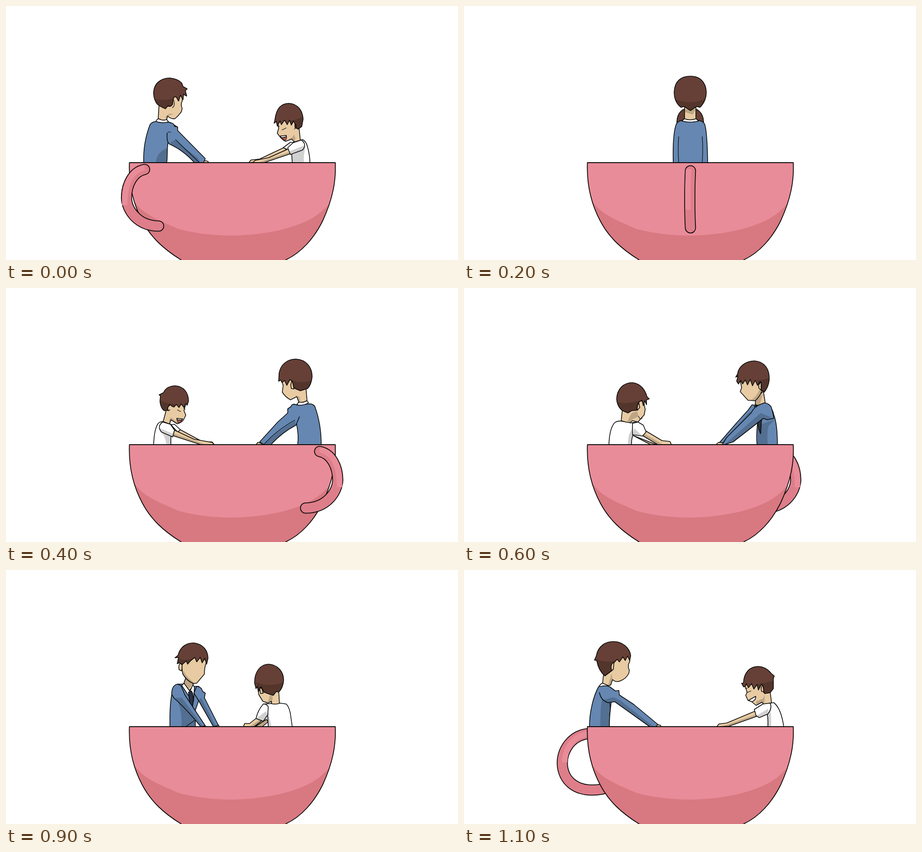
Write an HTML page that moves like this. It is 998x561 px and loops after 1200 ms.

```html
<!DOCTYPE html>
<html lang="en">
<head>
<meta charset="utf-8">
<title>Teacup ride</title>
<style>
  html, body { margin: 0; height: 100%; overflow: hidden; background: #fff; }
  svg { display: block; width: 998px; height: 561px; }
  path { stroke: #080808; stroke-width: 1.6; stroke-linejoin: round; }
  .h { fill: #664036; }
  .k { fill: #e8cba3; }
  .b { fill: #6587b1; }
  .w { fill: #fff; }
  .n { fill: #2b3447; }
  .m { fill: #b4574c; stroke-width: 1; }
  .s { fill: #000; fill-opacity: .18; stroke: none; }
  .l { fill: none; stroke-width: 1.2; }
  .tube path { fill: none; stroke-linecap: round; }
</style>
</head>
<body>
<svg viewBox="0 0 998 561">
  <clipPath id="bowl"><path d="M272.5 346H727C729 385 722 425 699 475C680 513 652 545 617 561H387C348 537 320 511 301 475C277 430 271 385 272.5 346Z"/></clipPath>
  <g id="back"></g>
  <g id="cup">
    <rect x="260" y="346" width="480" height="215" fill="#e98c99" clip-path="url(#bowl)"/>
    <path clip-path="url(#bowl)" style="fill:#d87880;stroke:none" d="M270 405L283 430C300 460 340 474 380 492C450 512 545 512 620 491C665 478 695 462 717 432L740 400V561H270Z"/>
    <path style="fill:none;stroke-width:1.8" d="M387 561C348 537 320 511 301 475C277 430 271 385 272.5 346H727C729 385 722 425 699 475C680 513 652 545 617 561"/>
  </g>
  <g id="front"></g>
</svg>
<script>
// Each pose is a stack of "class path" lines, keyed by its step of the turn.
const man = {
  0: `k M338 216L336 249Q345 254 354 253L357 243Q364 250 373 249Q380 243 387 234L389 226Q385 218 389 210L391 196L366 193Z
s M354 253L357 243L371 238L360 238L352 244Z
h M326 195C325 170 343 159 362 159Q380 161 388 170L391 178L400 183L396 187L399 199L392 195L391 207L385 197L381 210L376 201L371 201L369 207L368 217Q362 225 358 220L352 227Q340 222 334 217Q327 208 326 195Z
s M328 205Q350 211 370 203L368 217Q362 225 358 220L352 227Q340 222 334 217Z
l M369 206Q373 212 371 221L367 225
b M304 346C303 315 309 285 318 262Q322 256 331 255L362 257L378 267L358 300C355 315 357 330 355 346Z
s M331 346C333 325 345 318 356 314L355 346Z
w M331 255Q333 250 337 249Q345 254 355 251L359 256Q345 260 331 255Z
k M436 341L446 343L447 346H433Z
b M362 258Q371 258 372 266L379 267V275L440 337L436 346H416Q392 319 361 305Q354 300 356 280
s M363 301L372 296L424 336L430 346H416Q392 319 363 305Z
l M357 278L364 279M374 295L426 345`,
  1: `k M394 224L393 248Q402 254 411 252L414 244Q420 250 428 248Q437 238 440 226V203L420 200Z
s M411 252L414 244L428 245L414 238Z
h M376 190C378 168 393 157 412 157Q430 158 437 170Q443 178 444 186L448 191L444 196V209L440 201L438 210L433 204L429 213L426 227Q420 231 414 231L396 226Q381 216 377 203Z
s M378 206Q402 218 434 206L429 213L426 227Q420 231 414 231L396 226Q381 216 378 206Z
k M433 205Q428 212 428 222L433 219Z
b M420 311L441 346H418Z
s M420 311L441 346H418Z
b M362 346C361 310 364 275 371 258Q374 252 381 252L427 257L428 295L421 300Q421 325 420 346Z
w M387 253L392 248Q401 254 410 250L413 257Q398 258 387 253Z
b M425 257Q434 259 435 268L441 268V284Q455 318 475 345H461Q445 320 430 296L422 294L424 280
s M422 294L432 289Q453 325 465 345H461Q445 320 430 296Z`,
  2: `k M487 220V252H512V220Z
s M487 228H512L505 240L487 234Z
h M464 190C465 165 480 155 500 155S534 167 535 190Q535 210 521 224L514 222L500 231L486 222L479 224Q464 212 464 190Z
s M466 205Q499 220 533 205Q530 216 521 224L514 222L500 231L486 222L479 224Q469 216 466 205Z
b M462 346C461 310 463 275 469 260Q474 253 485 252H514Q526 253 531 260Q537 275 538 346Z
w M481 254L487 249Q499 254 512 249L518 254Q499 259 481 254Z
l M474 346Q472 315 474 288M526 346Q528 315 526 288`,
  4: `k M606 200L612 215L610 230Q616 240 628 247L642 240L646 251L645 257L665 252L662 218L630 198Z
s M642 240L646 253L650 250L648 240L638 237Z
h M602 206L603 188C606 170 620 157 640 157C663 158 676 175 676 196Q674 214 666 222L650 227L640 223Q632 218 631 206L627 202L620 215L615 204L610 209L606 203Z
s M632 205Q655 212 675 203Q672 216 666 222L650 227L640 223Q633 216 632 205Z
k M632 205Q627 212 630 222L636 223Z
b M644 346Q647 325 641 298L638 262Q640 257 648 258L668 256Q678 255 682 262Q696 300 696 346Z
w M642 257L647 252Q656 254 664 249L668 253Q662 259 646 259Z
k M552 346L556 341L564 343V346Z
b M641 258Q632 254 629 262L622 267V276L600 296L560 340L570 346H585Q608 320 640 303L648 284
s M638 294L640 303Q608 320 585 346H570Q600 315 638 294Z
l M570 345Q600 312 638 292`,
  11: `k M309 222L306 250L318 256L324 254L328 242Q335 249 345 245Q358 240 364 228L365 221Q360 212 366 202L364 186L330 193Z
s M326 228L328 242L324 254L318 256Z
h M292 190C296 168 312 158 330 158C350 158 366 172 368 189L366 200L361 190L356 200L351 192L343 203L338 197L331 205Q324 215 327 222L311 234Q297 222 293 200L288 199Z
s M293 197Q312 206 340 199L331 205Q324 215 327 222L311 234Q297 222 293 200Z
k M331 204Q322 208 326 222L330 219Z
b M277 346C277 315 285 280 297 258L303 252L322 259L325 293Q321 320 321 346Z
s M301 346Q301 300 305 285L325 293Q321 320 321 346Z
w M299 257Q301 251 306 250L318 255L315 258Z
k M426 341L434 343L435 346H420Z
b M303 257Q313 254 322 258L334 267L342 266L343 276L375 297L428 341L424 346H410L333 291L318 293Q302 288 299 270
s M306 287L330 281L345 288L419 346H410L333 291L318 293Z
l M321 292Q325 305 321 322`,
  6: `b M627 270L636 258L645 259L640 277L572 346H560L600 300Z
s M640 272L630 274L566 346H572Z
k M644 244L643 257L655 263L665 253L661 228Z
s M644 249L643 257L652 261L661 232Z
k M609 200L613 220L610 229L627 248L643 249Q655 238 658 226L655 200Z
s M643 249Q655 238 658 226L652 225Q648 238 632 249Z
h M602 206L605 194L600 197L604 190C606 173 622 161 642 161C665 163 675 180 674 203Q672 220 663 230L656 225Q658 213 654 207L648 215L643 204L637 216L632 202L626 214L621 203L615 212L611 204L606 212Z
s M648 203Q662 204 673 198Q674 218 663 230L656 225Q658 213 654 207L648 215Z
k M656 208Q649 212 651 221L656 226Z
b M663 254Q680 260 684 280Q692 300 692 346H647Q645 325 648 300L642 262Z
s M648 346V304L686 290L672 305Q668 330 671 346Z
w M641 261L648 262L644 272Z
n M648 293L657 289L655 322Q649 310 648 293Z
k M556 346L562 341L573 342L575 346Z
b M657 256Q668 250 678 262Q683 277 684 288L670 291L661 288L594 340L575 346H570L580 330L634 276Q640 262 657 256Z
s M684 288L670 291L661 288L594 340L575 346L655 276Z`,
  9: `k M397 238L392 252L403 268L413 262V250Z
s M397 238L392 252L403 264L413 251Z
k M387 203L390 229Q398 244 414 251L421 250L438 230Q438 215 442 205L439 190H400Z
s M390 229Q398 244 414 251L418 250Q400 240 392 222Z
h M380 188C385 168 400 161 414 161C435 163 446 178 446 195L443 208L439 195L433 205L429 193L421 203L417 193L408 200L401 208L398 201L389 209L383 205L378 207L381 193L373 194Z
s M380 196Q400 202 417 193L408 200L401 208L398 201L389 209L383 205L378 207Z
k M385 206Q380 210 382 220L388 223L389 210Z
b M362 346Q361 300 366 275Q368 255 380 252L393 252L403 268L413 257L426 257L430 275L418 310V346Z
s M387 346Q390 320 381 294L405 310L417 332V346Z
w M388 255L393 250L406 268L413 253L416 260L414 290L408 285Z
n M403 270L409 267L412 272L414 285L411 310L407 300L404 280Z
k M428 346L433 342L441 345ZM458 346L462 341L470 343V346Z
b M421 257Q432 258 434 268L440 272L438 282L469 343L458 346L425 288L415 272Z
s M425 288L431 282L463 345H458Z
b M366 275Q365 256 378 252L386 255L390 264L395 276L440 344L430 346Q405 315 380 291L371 283Z
s M371 283L388 282L434 344L430 346Q405 315 380 291Z
l M398 345L417 332`,
  8: `k M487 238V262H512V238Z
k M466 200Q466 225 476 236L494 251H505L523 236Q533 225 533 200Z
h M464 196C464 172 480 161 500 161S535 172 535 196L532 210L526 196L520 206L514 195L508 205L501 195L494 205L488 195L481 206L475 196L468 210Z
b M465 346Q462 300 465 275Q468 255 480 253H519Q531 255 534 275Q537 300 534 346Z
w M486 254H513L500 290Z
n M496 264H503L506 300L500 310L494 300Z`
};

const boy = {
  0: `k M613 313L620 317L562 344L536 346L541 340L560 338Z
w M612 313L628 301L636 302L622 317Z
k M600 258L602 270L599 281L605 289Q611 296 617 299L631 294L637 301L650 297L647 269L640 253H605Z
s M617 299L632 290L636 284L639 292L637 300L631 294Z
m M606 287L619 286Q621 293 617 297Q610 295 606 287Z
w M606 287L619 286V289L608 291Z
l M609 274L619 269M600 267L604 265
h M594 250C597 225 608 215 625 215C645 216 655 232 656 250L653 266L645 272L638 268V260L635 254L630 263L626 252L621 262L615 252L608 262L605 254L599 265L597 255L592 259Z
s M625 253Q640 252 655 245L653 266L645 272L638 268V260L635 254L630 263Z
l M637 260Q643 262 640 270L636 272
w M632 346L630 312L634 301L655 295Q663 299 666 312Q671 330 671 346Z
s M632 346V328L655 318L662 308Q656 330 658 346Z
k M625 315L629 326L570 346H545L550 341L580 335Z
s M628 322L629 326L570 346H556Z
w M634 302L652 296Q665 305 655 318L628 328L622 313Z
s M628 328L626 321L658 308L655 318Z`,
  1: `k M547 318L555 326L522 346H505L507 342L518 340Z
k M549 260L552 283L560 293Q567 298 576 296L575 305L583 312L593 303L589 272L584 256H552Z
s M567 297L584 286L588 287L576 301V296Z
m M554 288L571 288Q570 297 562 296Z
w M554 288L571 288L568 291H557Z
l M551 275L558 276M564 274L574 271M558 279L556 283
h M545 255C547 232 558 222 573 222C590 223 600 238 600 254Q598 270 591 276L587 271L585 260L580 268L577 258L572 266L568 257L561 265L557 258L551 266L548 259L543 265Z
s M568 257Q585 260 599 250Q598 270 591 276L587 271L585 260L580 268L577 258L572 266Z
l M586 263Q590 268 587 275
w M556 312L562 303L575 304Q583 315 592 302L608 299Q617 306 619 325L620 346H567L566 328Z
s M568 346L567 336L592 334L612 320Q596 334 600 346Z
w M549 318L562 302L571 306L565 329L556 326Z
s M556 326L568 312L565 329Z
k M586 321L592 332L560 346H530L540 338Z
w M592 302L607 298Q616 306 614 316L592 335L584 322Z
s M592 335L588 328L611 306L614 316Z`,
  2: `h M470 255C471 235 483 225 499 225S528 235 529 255V285H470Z`,
  3: `k M451 318L446 326L474 345L490 346L492 342L483 341Z
k M412 260L405 275V304Q412 313 421 307L422 293Q431 299 438 295L444 285L441 277L448 268V256L420 253Z
s M422 293Q427 298 433 298L418 290L415 284L414 291L421 300Z
m M426 288L440 289Q438 297 433 296Z
w M426 288L440 289L437 292L429 291Z
l M423 273L431 276M438 275L446 272
h M397 255L398 240L396 238L404 231C410 224 418 222 426 222C443 223 453 237 453 254L450 262L446 257L442 264L437 257L432 265L428 258L423 265L417 262L413 262L409 276L404 274Q397 266 397 255Z
s M398 252Q412 261 428 258L423 265L417 262L413 262L409 276L404 274Q398 266 398 252Z
k M413 262Q406 264 410 275L413 272
w M376 346Q378 312 387 300L405 304Q413 314 421 306L430 302V346Z
s M390 346Q395 336 407 333L430 336V346Z
w M430 302L436 301L451 317L446 327L434 328L428 312Z
s M434 328L432 314L446 327Z
k M412 320L406 331L437 346H470L460 341L446 339Z
w M388 300Q380 305 386 318L406 334L412 321L405 304Z
s M386 312L406 327L412 321L406 334L386 318Z`,
  4: `k M385 313L379 318L430 341L445 345L460 346L455 340L433 339Z
w M364 302L372 301L385 313L379 318Z
k M357 258L347 295L361 301L364 291L378 300Q387 298 392 291L397 281L393 271L397 255L370 250Z
s M364 291L378 300L382 299L364 286L361 290L360 300Z
m M377 288L390 289Q386 298 380 298Q377 294 377 288Z
w M377 288L390 289L387 292L378 291Z
l M378 269L386 273M392 266L396 268
h M340 250L341 238L338 236L348 231C352 221 362 216 374 216C393 217 403 232 403 250L400 259L397 255L393 264L387 256L382 264L376 257L371 263L366 261L362 257Q357 261 358 270L349 271Q341 264 340 250Z
s M341 248Q356 256 376 257L371 263L366 261L362 257Q357 261 358 270L349 271Q342 264 341 248Z
k M362 259Q355 262 358 271L362 269
w M326 346Q327 312 336 299Q340 295 346 295L364 301L372 313L364 330V346Z
s M354 346Q352 328 343 319L364 327V346Z
k M372 314L368 326L430 346H460L455 341L415 334Z
s M369 321L368 326L430 346H442Z
w M346 296Q333 305 343 318L368 329L372 314L363 301Z
s M340 310L369 322L368 329L343 318Z`,
  11: `k M620 254L625 270L622 277L627 288L634 290L645 299L658 292L664 300L679 293L676 269L655 251Z
s M645 299V290L660 284L664 276L663 299L658 292Z
w M628 288L644 279Q646 286 636 291Z
l M624 271L634 267M621 262L626 261
h M617 250C618 225 632 213 650 213Q667 214 678 228L685 234L683 240V262L676 271L664 273L660 268L661 258L657 252L650 265L647 253L640 263L635 251L628 260L624 251L620 258L617 258L613 250Z
s M648 252Q665 249 684 245L683 262L676 271L664 273L660 268L661 258L657 252L650 265Z
k M660 255Q654 258 657 268L662 269Z
w M662 296L684 293Q700 305 706 346H671Q672 325 668 312Z
s M671 346Q672 325 668 318L676 304Q679 325 678 346Z
k M642 312L647 323L585 345L558 346L563 340L580 338Z
s M645 319L647 323L585 345H572Z
w M641 308L660 296L676 294Q681 305 671 318L652 326L645 322Z
s M652 326L645 322L672 306L671 318Z`,
  6: `k M374 326L425 346H412Z
s M374 326L425 346H412Z
k M350 266L347 293L365 299L372 293L384 296L398 280L400 268L397 252L385 246Z
s M361 294L370 276L382 272L386 284L372 290L366 298Z
l M385 283L389 290L394 287
h M337 245C338 222 353 209 372 209C390 211 400 225 404 240L409 245L403 247V258L399 249L396 260L393 248L386 252Q381 262 382 270L370 271L362 276L350 271Q338 262 337 245Z
s M338 252Q360 257 389 249L386 252Q381 262 382 270L370 271L362 276L350 271Q340 264 338 252Z
k M386 253Q381 262 383 270L388 264Z
w M320 346Q321 312 332 298Q338 293 347 294L368 298L380 296L374 322Q369 335 370 346Z
s M361 346L364 325L374 304L380 324L374 324Q369 335 370 346Z
k M402 316L437 337L455 339L458 346H428L394 326Z
s M398 322L440 346H428L394 326Z
w M372 299L384 296L396 303L402 318L394 327L372 324Z
s M372 324L376 310L394 327Z`,
  9: `k M575 330L579 335L566 346H550Z
s M575 330L579 335L566 346H550Z
k M555 256L558 275L567 290L578 294L586 290V298H604L602 266L580 265Z
s M567 290L578 294L583 275L589 280L587 297L584 291Z
h M549 250C548 225 562 208 580 208C600 209 613 225 613 243Q612 260 602 270L597 268L590 277L581 274L570 270L563 258L558 268L555 257L552 262Z
s M551 247Q580 260 612 248Q611 262 602 270L597 268L590 277L581 274L570 270L563 258L558 268L555 257Z
k M560 260L565 262L568 272L562 273Z
w M568 296L586 295Q595 298 605 294L619 296Q627 305 629 325L632 346H579L578 325Z
s M574 318L577 304L586 346H579L578 325Z
k M553 327L565 333L548 346H524L527 339L538 339Z
s M560 331L565 333L548 346H538Z
w M568 296Q575 295 579 302L578 320L568 334L552 328Q556 310 568 296Z
s M552 328L574 312L578 320L568 334Z`,
  8: `k M488 266V297H511V266Z
s M488 277L511 272L505 288Z
h M467 243C467 222 480 207 499 207S532 222 532 243Q531 260 520 270L512 269L500 277L487 269L479 270Q468 260 467 243Z
s M468 250Q499 262 531 250Q529 263 520 270L512 269L500 277L487 269L479 270Q470 263 468 250Z
w M470 346L469 330L462 330Q464 306 476 297L490 294Q499 298 510 294L523 297Q535 306 537 330L530 330L529 346Z
l M469 330L472 315M530 330L527 315`
};

const strand = (d, width, color, cap) =>
  `<path d="${d}" style="stroke:${color};stroke-width:${width};stroke-linecap:${cap}"/>`;
const tube = (d, shine) => `<g class="tube">${strand(d, 24.5, "#080808", "round")
  }${strand(d, 21, "#de7e8a", "round")}${strand(shine, 12, "#e98c99", "butt")}</g>`;
const near = tube("M306 361C280 366 266 395 266 424C267 452 292 486 337 486", "M306 357C275 363 262 395 262 440");
const handle = {
  0: near,
  1: tube("M386 364C362 370 352 395 352 418C354 452 372 492 393 492L402 488", "M386 360C360 366 348 395 348 418Q349 434 353 448"),
  2: tube("M500 364C498 400 498 455 500 490", "M496 360C494 390 494 420 495 450"),
  10: near,
  11: tube("M278 361C235 364 217 400 217 427C218 465 248 494 305 484", "M278 361C240 366 224 392 222 425")
};

const draw = lines => lines.split("\n").map(s => `<path class="${s[0]}" d="${s.slice(2)}"/>`).join("");
for (const who of [man, boy])
  for (const step in who) who[step] = draw(who[step]);

// A step without its own pose mirrors the one across the turn.
const pose = (set, step, axis) => set[step] ||
  `<g transform="matrix(-1 0 0 1 ${axis} 0)">${set[(16 - step) % 12] || ""}</g>`;

const back = document.getElementById("back"), front = document.getElementById("front");
let shown = -1;
function tick() {
  const step = Math.floor(performance.now() / 100) % 12;
  if (step !== shown) {
    shown = step;
    const grip = pose(handle, step, 998.5);
    const people = [pose(boy, step, 995), pose(man, step, 998.5)];
    if (step > 4) people.reverse();
    back.innerHTML = (step > 4 ? grip : "") + people.join("");
    front.innerHTML = step > 4 ? "" : grip;
  }
  requestAnimationFrame(tick);
}
tick();
</script>
</body>
</html>
```
